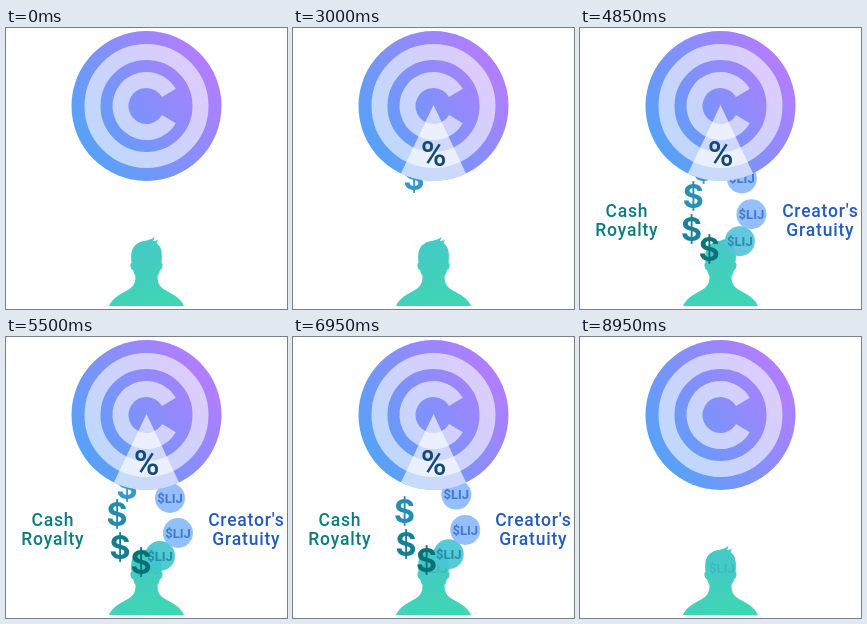
Recreate the animation shown at these times as an HTML page with a canvas. Size 281x281 px, loop 9 s.

```html
<!DOCTYPE html>
<html lang="en">
<head>
<meta charset="utf-8">
<title>Creator royalties</title>
<style>
html, body { margin: 0; width: 100%; height: 100%; overflow: hidden; background: #fff; }
canvas { display: block; width: 281px; height: 281px; }
</style>
</head>
<body>
<canvas id="stage"></canvas>
<script>
const SIZE = 281, LOOP = 9000, STEP = 50, PERIOD = 500, COUNT = 8;
const CX = 140.5, CY = 78;
const TOKEN = '$LIJ';
const FONT = 'Roboto, "Open Sans", sans-serif';
const WIDE_FONT = 'Inter, "Open Sans", sans-serif';
const canvas = document.getElementById('stage');
const ctx = canvas.getContext('2d');
const dpr = window.devicePixelRatio || 1;
canvas.width = canvas.height = Math.round(SIZE * dpr);

// Waypoints, one per emission period; the second one is phase 0.
const dollarPath = [[128, 125], [121, 150], [111, 177], [114, 210], [135, 225], [141, 232]];
const tokenPath = [[158, 130], [164, 161], [172, 196], [154, 219], [141, 232]];

const clamp = v => Math.max(0, Math.min(1, v));
const ramp = (t, a, b) => clamp((t - a) / (b - a));
const fadeInOut = (t, a, b, c, d) => ramp(t, a, b) * (1 - ramp(t, c, d));
const mix = (a, b, u) =>
  `rgb(${a.map((v, i) => Math.round(v + (b[i] - v) * u)).join(',')})`;

function spline(a, b, c, d, u) {
  return 0.5 * (2 * b + (c - a) * u + (2 * a - 5 * b + 4 * c - d) * u * u
    + (3 * b - a - 3 * c + d) * u * u * u);
}

function pointAt(path, phase) {
  const last = path.length - 1;
  const p = Math.max(0, Math.min(last, phase + 1));
  const i = Math.min(last - 1, Math.floor(p));
  const at = k => path[Math.max(0, Math.min(last, k))];
  return [0, 1].map(n => spline(at(i - 1)[n], at(i)[n], at(i + 1)[n], at(i + 2)[n], p - i));
}

function gradient(x0, y0, x1, y1, from, to) {
  const g = ctx.createLinearGradient(x0, y0, x1, y1);
  g.addColorStop(0, from);
  g.addColorStop(1, to);
  return g;
}

function disc(x, y, r, fill) {
  ctx.fillStyle = fill;
  ctx.beginPath();
  ctx.arc(x, y, r, 0, Math.PI * 2);
  ctx.fill();
}

function text(str, x, y, size, weight, color, { spacing = 0, font = FONT } = {}) {
  ctx.font = `${weight} ${size}px ${font}`;
  ctx.letterSpacing = spacing + 'px';
  ctx.fillStyle = color;
  ctx.textAlign = 'center';
  ctx.fillText(str, x + spacing / 2, y);
}

function withAlpha(alpha, draw) {
  if (alpha <= 0) return;
  ctx.save();
  ctx.globalAlpha = alpha;
  draw();
  ctx.restore();
}

function person() {
  ctx.fillStyle = gradient(125, 210, 150, 278, '#46c8c8', '#3fd6b4');
  ctx.beginPath();
  ctx.moveTo(103, 278);
  ctx.bezierCurveTo(106, 270, 115, 266, 121, 262.5);
  ctx.bezierCurveTo(127, 259, 129.5, 256, 129.5, 248);
  ctx.bezierCurveTo(128, 246, 127.5, 244, 127, 242);
  ctx.bezierCurveTo(124.5, 242, 123.5, 235, 125.5, 235);
  ctx.bezierCurveTo(124.5, 226, 125.5, 219, 131, 216);
  ctx.bezierCurveTo(136, 211.5, 144, 214, 148.5, 208.5);
  ctx.bezierCurveTo(148, 211, 147.5, 212, 147, 213);
  ctx.bezierCurveTo(150, 213, 151, 212, 152, 211.5);
  ctx.bezierCurveTo(151.5, 213, 151, 214, 150.5, 215);
  ctx.bezierCurveTo(156, 219, 156.5, 226, 155.5, 235);
  ctx.bezierCurveTo(157.5, 235, 156.5, 242, 154, 242);
  ctx.bezierCurveTo(153.5, 244, 153, 246, 151.5, 248);
  ctx.bezierCurveTo(151.5, 256, 154, 259, 160, 262.5);
  ctx.bezierCurveTo(166, 266, 175, 270, 178, 278);
  ctx.closePath();
  ctx.fill();
}

function copyright() {
  disc(CX, CY, 75, gradient(80, 122, 200, 40, '#56a2f6', '#b07eff'));
  ctx.strokeStyle = 'rgba(255,255,255,.6)';
  ctx.lineWidth = 16;
  ctx.beginPath();
  ctx.arc(CX, CY, 54, 0, Math.PI * 2);
  ctx.stroke();
  ctx.beginPath();
  ctx.arc(CX, CY, 26, 0.53, Math.PI * 2 - 0.53);
  ctx.stroke();
}

function share(t) {
  withAlpha(fadeInOut(t, 2250, 2800, 8350, 8850), () => {
    ctx.fillStyle = 'rgba(255,255,255,.64)';
    ctx.beginPath();
    ctx.moveTo(CX, CY - 1);
    ctx.arc(CX, CY, 75, Math.PI / 2 - 0.45, Math.PI / 2 + 0.45);
    ctx.closePath();
    ctx.fill();
    text('%', CX, 137.5, 35, 500, '#134a72');
  });
}

function coin(x, y, r, fill, ink, opacity) {
  withAlpha(opacity, () => {
    disc(x, y, r, fill);
    text(TOKEN, x, y + r * 0.31, r * 0.87, 700, ink);
  });
}

function payment(t) {
  if (t > 2860) return;
  const u = (1 - Math.cos(Math.PI * ramp(t, 410, 2860))) / 2;
  const y = 235 - 157 * u;
  const hue = clamp(u * 1.8);
  const fill = gradient(CX, y - 30, CX, y + 30,
    mix([66, 180, 210], [94, 158, 250], hue), mix([66, 200, 200], [84, 176, 226], hue));
  coin(CX, y, 30, fill, '#1d4f86', ramp(t, 0, 500));
}

function tokens(t) {
  for (let k = 0; k < COUNT; k++) {
    const phase = (t - 4000) / PERIOD - k;
    if (phase < -1 || phase > 3) continue;
    const [x, y] = pointAt(tokenPath, phase);
    const hue = ramp(phase, 0.9, 2);
    coin(x, y, 15, mix([140, 186, 252], [66, 198, 206], hue),
      mix([58, 116, 198], [34, 138, 164], hue), 0.92 * (1 - ramp(phase, 2.5, 3.05)));
  }
}

function dollars(t) {
  for (let k = 0; k < COUNT; k++) {
    const phase = (t - 3000) / PERIOD - k;
    if (phase < -1 || phase > 3.6) continue;
    const [x, y] = pointAt(dollarPath, phase);
    const color = mix([52, 152, 202], [6, 112, 114], ramp(phase, 0, 3));
    withAlpha(1 - ramp(phase, 3.05, 3.6), () =>
      text('$', x, y + 11.5, 32, 700, color, { font: WIDE_FONT }));
  }
}

function label(lines, x, color, alpha) {
  withAlpha(alpha, () => lines.forEach((line, i) =>
    text(line, x, 188.5 + 19.5 * i, 17.5, 500, color, { spacing: 0.8 })));
}

function draw(t) {
  ctx.setTransform(dpr, 0, 0, dpr, 0, 0);
  ctx.fillStyle = '#fff';
  ctx.fillRect(0, 0, SIZE, SIZE);
  person();
  payment(t);
  tokens(t);
  dollars(t);
  copyright();
  share(t);
  label(['Cash', 'Royalty'], 46.5, '#0b7d7f', fadeInOut(t, 3100, 3600, 7400, 7900));
  label(["Creator's", 'Gratuity'], 240, '#235cbc', fadeInOut(t, 3950, 4450, 8000, 8500));
}

const start = performance.now();
function tick() {
  const t = (performance.now() - start) % LOOP;
  draw(Math.floor(t / STEP) * STEP);
  requestAnimationFrame(tick);
}
tick();
</script>
</body>
</html>
```
